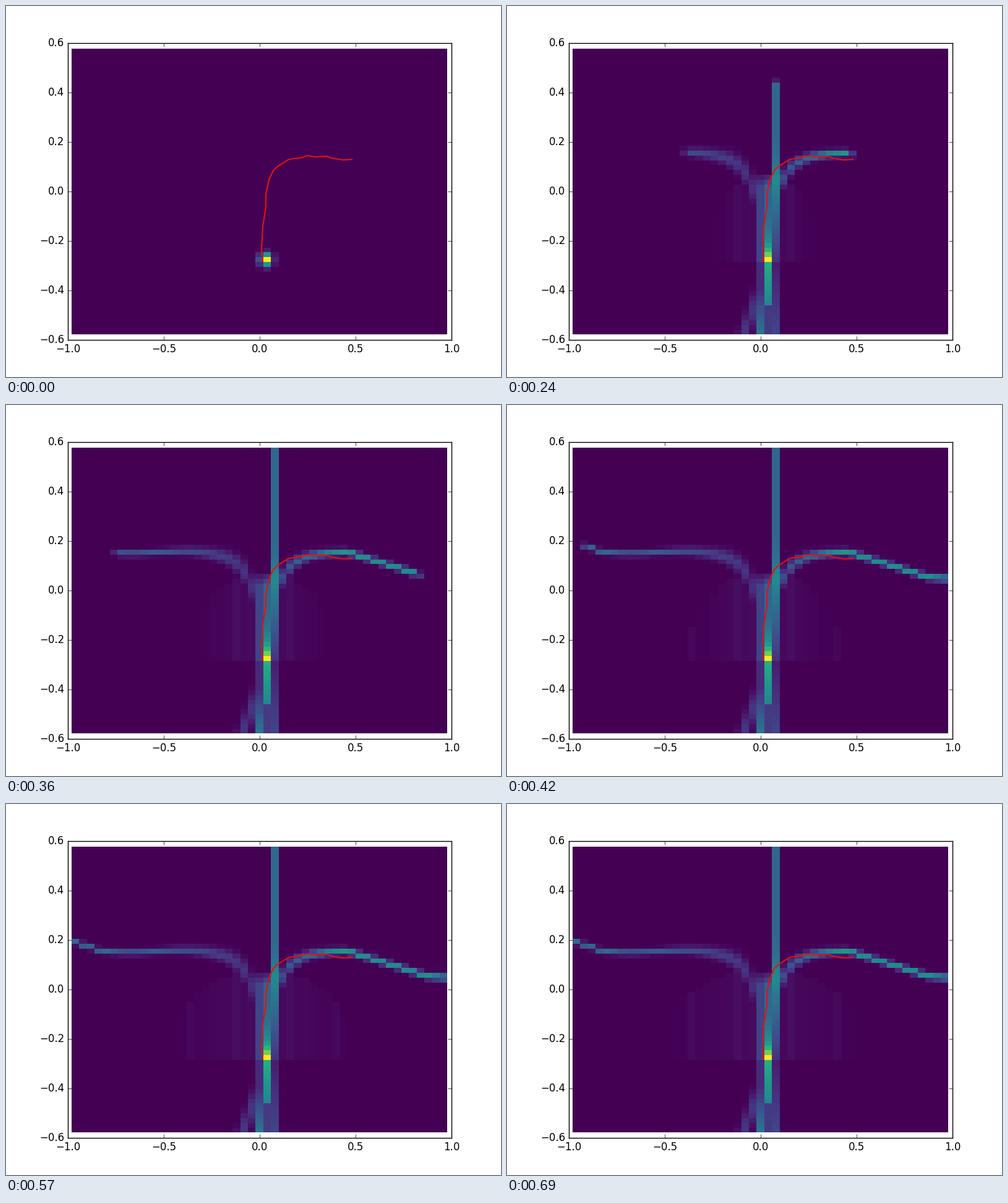
Write a matplotlib script that moves like this. It is 800x600 px and loops after 0.72 s.

```python
import numpy as np
import matplotlib.pyplot as plt
from matplotlib.animation import FuncAnimation

plt.style.use("classic")
plt.rcParams["font.family"] = "DejaVu Sans"

FRAMES, INTERVAL = 24, 30
SPEED = 4.5                 # rows travelled by the wave per frame
START_COL, START_ROW = 1, -14
PX_X, PX_Y = 1 / 310, 1 / 400   # data units per pixel

cols = np.arange(-24, 25)
rows = np.arange(-29, 30)
K, R = np.meshgrid(cols, rows)
# Nudged so that cell edges round down to whole pixels
x_edges = np.linspace(-0.98, 0.98, len(cols) + 1) - 0.45 * PX_X
y_edges = np.linspace(-0.5775, 0.5775, len(rows) + 1) - 0.45 * PX_Y


def ramp(x):
    return np.clip(x, 0, 1)


def bell(x, width):
    return np.exp(-(x / width) ** 2)


def stem_field():
    """Settled values of the vertical streams."""
    up = R - START_ROW
    fade = ramp((4 - R) / 3)
    centre = np.where(up > 0, 0.31 + 0.47 * np.exp(-(up - 1) / 3),
                      np.where(up > -10, 0.62 + 0.02 * (up + 1), 0.17))
    centre = np.where(up == 0, 1, centre * fade)
    beside = np.where(up >= 0, 0.2 * fade, 0.12 + 0.26 * ramp((-20 - R) / 9))
    beam = np.where(R > 2, 0.33 + 0.14 * bell(R - 2, 4),
                    np.where(up >= 0, 0.47 - 0.02 * (2 - R), 0.07 - 0.009 * up))
    offshoot = 0.16 * bell(R + 20.5 - 4 * K, 3)
    return np.select([K == 0, K == 1, K == 2, (K < 0) & (K > -4)],
                     [beside, centre, beam, offshoot], 0)


def right_arm():
    """Climbs out of the stem, then slopes gently down."""
    climb = 8.1 - 5.3 * np.exp(-(K - 3) / 2)
    slope = np.maximum(7.25 - 0.5 * (K - 13), 5.2 - 0.11 * K)
    width = 0.6 + 1.1 * np.exp(-(K - 3) / 2.5)
    peak = 0.23 + 0.33 * ramp((K - 3) / 9)
    return np.where(K >= 3, peak * bell(R - np.minimum(climb, slope), width), 0)


def left_arm():
    """Climbs out of the stem, ripples and rises at its far end."""
    d = np.maximum(-K, 1)
    centre = (7.95 - 7 * np.exp(-(d - 1) / 1.6)
              + 0.25 * np.cos((d - 10) * np.pi / 7)
              + 0.45 * np.maximum(d - 20.5, 0))
    width = 0.5 + 2 * np.exp(-(d - 1) / 4)
    peak = 0.13 + 0.011 * d
    return np.where(K <= -1, peak * bell(R - centre, width), 0)


def fan(n):
    """Faint sideways spread above the start row."""
    reach = 4 + 0.45 * n
    spread = np.abs(K - 0.5)
    up = (R - START_ROW) / 18
    inside = (up >= 0) & ((spread / reach) ** 2 + up ** 2 < 1)
    bands = 0.014 * (spread % 6 == 3.5)
    return np.where(inside, 0.028 * (1 - spread / reach) + bands, 0)


stem, right, left = stem_field(), right_arm(), left_arm()
stem_dist = np.abs(R - START_ROW)
right_dist = 24 + 2 * (K - 6)
left_dist = 28 + 2 * (-K - 6)


def density(n):
    if n == 0:
        dk, dr = K - START_COL, R - START_ROW
        return np.exp(-1.9 * dk ** 2 - 0.5 * dk - 0.65 * dr ** 2)
    front = SPEED * n
    layers = [
        stem * ramp(front + 1.2 - stem_dist),
        right * ramp((front + 1 - right_dist) / 3),
        left * ramp((front + 1 - left_dist) / 3),
        fan(n),
    ]
    if n <= 4:
        tip = START_ROW + front - 1.5
        layers.append(0.14 * bell(K - START_COL, 2.4) * bell(R - tip, 1.5))
    return np.maximum.reduce(layers)


fig = plt.figure(figsize=(8, 6), dpi=100, facecolor="white")
ax = fig.add_axes([0.125, 0.1, 0.775, 0.8])
mesh = ax.pcolormesh(x_edges, y_edges, density(0), cmap="viridis", vmin=0, vmax=1)

# Recorded path, in stage pixels
trail = np.array([
    (559, 248), (545, 249), (526, 246), (519, 243), (500, 244), (487, 242),
    (479, 245), (457, 248), (438, 260), (432, 266), (425, 281), (420, 305),
    (420, 325), (415, 357), (413, 395), (415, 413)])
ax.plot((trail[:, 0] - 410) * PX_X, (300 - trail[:, 1]) * PX_Y,
        color="#ea100c", lw=1.5)


def label(value, _):
    return f"{round(value, 1) + 0:.1f}".replace("-", "\u2212")


ax.set_xlim(-1, 1)
ax.set_ylim(-0.6, 0.6)
ax.set_xticks(np.linspace(-1, 1, 5))
ax.set_yticks(np.linspace(-0.6, 0.6, 7))
ax.xaxis.set_major_formatter(label)
ax.yaxis.set_major_formatter(label)


def update(n):
    mesh.set_array(density(n))
    return (mesh,)


anim = FuncAnimation(fig, update, frames=FRAMES, interval=INTERVAL,
                     repeat=True, repeat_delay=0, blit=False)
plt.show()
```
